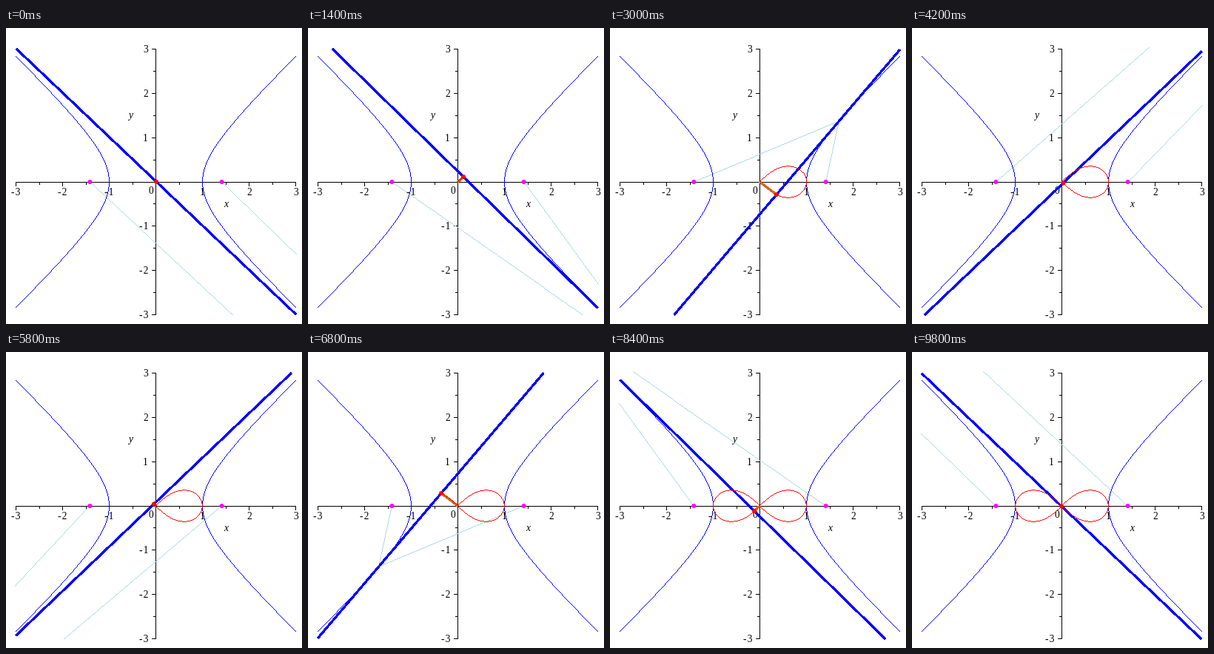
Animation of 400 by 400 pixels, one loop 10000 ms. Source, as a matplotlib script:

```python
import numpy as np
import matplotlib.pyplot as plt
from matplotlib.animation import FuncAnimation
from matplotlib.patches import Circle, PathPatch
from matplotlib.path import Path

FRAMES, STEP_MS = 50, 200
U_MAX = 5.0
FOCUS = np.sqrt(2)
PX = 0.72  # points per pixel at 100 dpi
CORNERS = np.array([[0, 0], [1, 0], [1, 1], [0, 1]])


def sx(x):
    return 202.5 + 63 * np.asarray(x)


def sy(y):
    return 208 - 59.83 * np.asarray(y)


def foot(u, sign):
    """Foot of the perpendicular from the origin to the tangent."""
    c, s = sign * np.cosh(u), np.sinh(u)
    return c / (c * c + s * s), -s / (c * c + s * s)


def hairline(x, y):
    """Crisp one-pixel polyline as a compound path of unit squares."""
    steps = np.maximum(abs(np.diff(x)), abs(np.diff(y)))
    s = np.concatenate(([0], np.cumsum(steps)))
    q = np.linspace(0, s[-1], int(np.ceil(s[-1])) + 1)
    cells = np.floor(np.c_[np.interp(q, s, x), np.interp(q, s, y)])
    inside = np.all((cells >= (12, 26)) & (cells < (393, 388)), axis=1)
    cells = np.unique(cells[inside], axis=0)
    return Path.make_compound_path_from_polys(cells[:, None] + CORNERS)


fig = plt.figure(figsize=(4, 4), dpi=100, facecolor="white")
ax = fig.add_axes([0, 0, 1, 1])
ax.set(xlim=(0, 400), ylim=(400, 0))
ax.axis("off")


def thin(x, y, color, z):
    return ax.add_patch(PathPatch(hairline(x, y), fc=color, ec="none", lw=0,
                                  snap=True, zorder=z))


def thick(color, z):
    art, = ax.plot([], [], color=color, lw=2 * PX, zorder=z,
                   antialiased=False, solid_capstyle="butt")
    return art


def dot(x, y, color, z):
    return ax.add_patch(Circle((sx(x), sy(y)), 3, fc=color, ec="none",
                               zorder=z))


def label(x, y, text, ha="center", style="normal"):
    ax.text(x, y, text, ha=ha, va="center_baseline", style=style,
            family="Liberation Serif", size=13.5 * PX, zorder=3)


def draw_axes():
    thin(sx([-3, 3]), sy([0, 0]), "black", 2)
    thin(sx([0, 0]), sy([-3, 3]), "black", 2)
    for i in range(-6, 7):
        if i == 0:
            continue
        size = 3 if i % 2 else 5
        px, py = float(sx(i / 2)), float(sy(i / 2))
        thin([px, px], [208, 208 + size], "black", 2)
        thin([202 - size, 202], [py, py], "black", 2)
        if i % 2 == 0:
            n = i // 2
            text = str(n) if n > 0 else "-\u200a" + str(-n)
            label(px, 221, text)
            label(192, py - 0.5, text, ha="right")
    label(196, 219, "0")
    label(297, 237, "x", style="italic")
    label(168, 117, "y", style="italic")


def draw_hyperbola():
    u = np.linspace(-1, 1, 80) * np.arccosh(3)
    for sign in (-1, 1):
        thin(sx(sign * np.cosh(u)), sy(np.sinh(u)), "blue", 3)


draw_axes()
draw_hyperbola()
start = sx([0, 0]), sy([0, 0])
rays = [thin(*start, "lightblue", 2.5) for _ in range(2)]
traces = [thin(*start, "red", 6) for _ in range(2)]
tangent = thick("blue", 4)
arm = thick("chocolate", 5)
for side in (-1, 1):
    dot(side * FOCUS, 0, "magenta", 7)
tip = dot(0, 0, "red", 8)


def update(k):
    run = 4 * U_MAX * k / (FRAMES - 1)
    second = run > 2 * U_MAX
    sign = -1 if second else 1
    u = run - U_MAX - (2 * U_MAX if second else 0)
    px, py = sign * np.cosh(u), np.sinh(u)

    # Tangent px*x - py*y = 1, cut to the square |x|, |y| <= 3
    ends = sorted((1 + py * y) / px for y in (-3, 3))
    xs = np.clip(ends, -3, 3)
    tangent.set_data(sx(xs), sy((px * xs - 1) / py))

    for ray, side in zip(rays, (-1, 1)):
        ray.set_path(hairline(sx([side * FOCUS, px]), sy([0, py])))

    for trace, s, stop in ((traces[0], 1, U_MAX if second else u),
                           (traces[1], -1, u if second else -U_MAX)):
        fx, fy = foot(np.linspace(-U_MAX, stop, 160), s)
        trace.set_path(hairline(sx(fx), sy(fy)))

    fx, fy = foot(u, sign)
    arm.set_data(sx([0, fx]), sy([0, fy]))
    tip.center = sx(fx), sy(fy)
    return [*rays, *traces, tangent, arm, tip]


anim = FuncAnimation(fig, update, frames=FRAMES, interval=STEP_MS,
                     repeat=True, repeat_delay=0)
plt.show()
```
